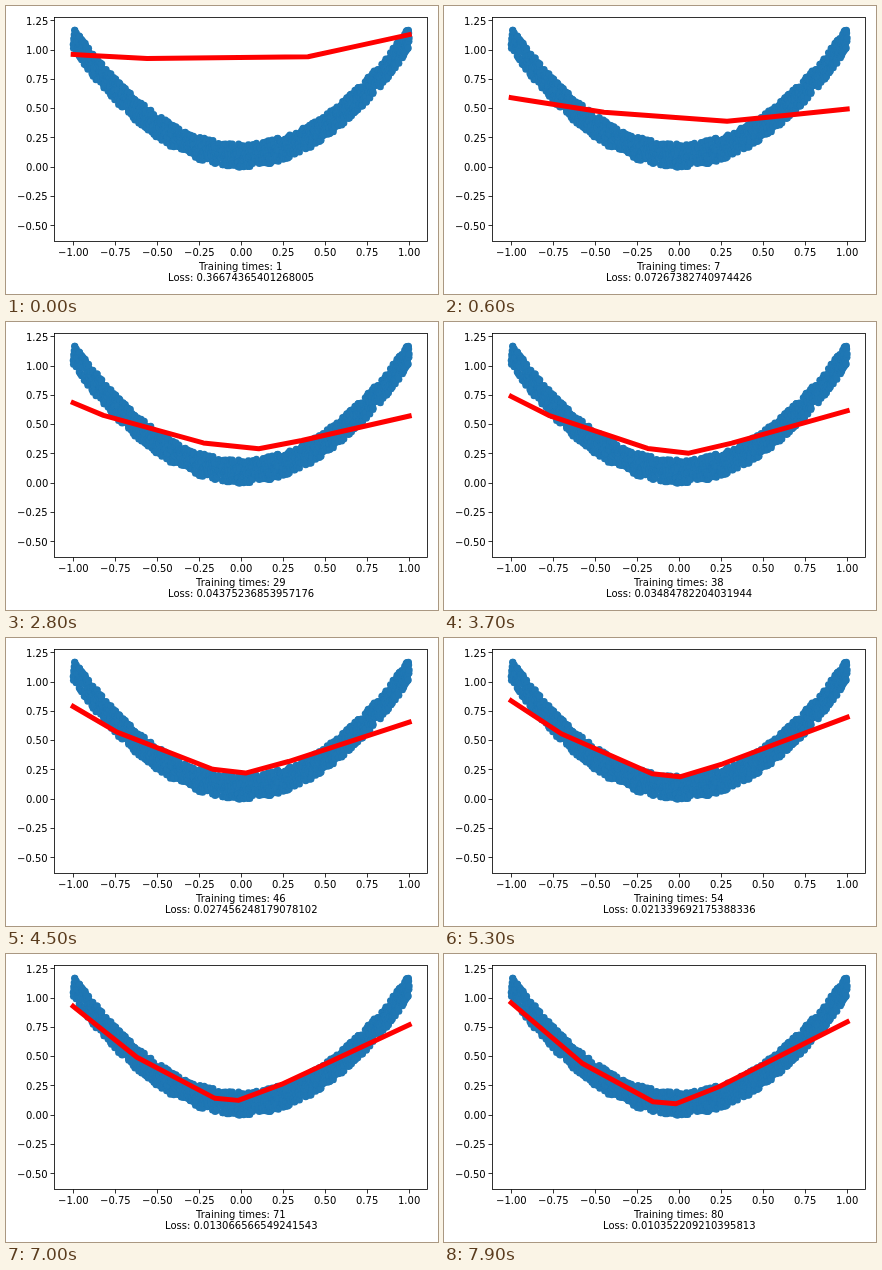
An HTML page with a canvas that plays this animation: 432 by 288 pixels, repeating every 8 s.

```html
<!DOCTYPE html>
<html>
<head>
<meta charset="utf-8">
<style>
html, body { margin: 0; width: 432px; height: 288px; overflow: hidden; background: #fff; }
canvas { display: block; }
</style>
</head>
<body>
<canvas id="stage" width="432" height="288"></canvas>
<script>
const ctx = document.getElementById('stage').getContext('2d');
const LOOP = 8000, STEP = 100, WARMUP = 6, LAST = 79;
const LEFT = 67.2, RIGHT = 403.2;

const px = x => 235.2 + 168 * x;
const py = y => 161.2 - 117 * y;
const mix = (a, b, t) => a + (b - a) * t;
const easeOut = (t, power) => 1 - (1 - t) ** power;
const steady = t => (t + t * t * (3 - 2 * t)) / 2;
const settle = step => 1 - 0.4 ** step;

// known losses; the steps between fall geometrically
const losses = [
  [0, 0.36674365401268005],
  [6, 0.07267382740974426],
  [18, 0.056338876485824585],
  [37, 0.03484782204031944],
  [45, 0.027456248179078102],
  [62, 0.016071390360593796],
  [79, 0.010352209210395813]
];

function lossAt(step) {
  const next = losses.findIndex(([at]) => at >= step);
  const [endAt, end] = losses[next];
  if (endAt === step) return end;
  const [startAt, start] = losses[next - 1];
  const t = step < WARMUP ? settle(step) : (step - startAt) / (endAt - startAt);
  return Math.fround(start * (end / start) ** t);
}

let seed = 20;
function random() {
  seed = (seed * 1664525 + 1013904223) % 4294967296;
  return seed / 4294967296;
}

const DOTS = 1400;
const dots = Array.from({ length: DOTS }, (_, i) => {
  const x = -1 + 2 * i / (DOTS - 1);
  return [px(x), py(Math.min(1.17, x * x + 0.2 * random()))];
});

function drawDots() {
  ctx.fillStyle = '#1f77b4';
  for (const [x, y] of dots) {
    ctx.beginPath();
    ctx.arc(x, y, 3.5, 0, 2 * Math.PI);
    ctx.fill();
  }
}

// a point between a and b, pushed down from their chord
function sagPoint(a, b, x, sag) {
  return [x, mix(a[1], b[1], (x - a[0]) / (b[0] - a[0])) + sag];
}

function fitAt(step) {
  const t = Math.max(0, step - WARMUP) / (LAST - WARMUP);
  const s = settle(step);
  const left = [LEFT, mix(48.5, mix(91.9, 48.8, steady(t)), s)];
  const right = [RIGHT, mix(28.7, mix(103.3, 67.8, steady(t)), s)];
  const bendA = [
    mix(141, mix(160, 209, easeOut(t, 4)), s),
    mix(52.5, mix(106.5, 147.7, easeOut(t, 1.2)), s)
  ];
  const bendB = [
    mix(302, mix(283, 232, easeOut(t, 2.5)), s),
    mix(50.7, mix(115.6, 149.8, easeOut(t, 1.1)), s)
  ];
  return [
    left,
    sagPoint(left, bendA, mix(80, 138, t), 11 * t),
    bendA,
    bendB,
    sagPoint(bendB, right, bendB[0] + 43, 3.5 * t),
    right
  ];
}

function drawFit(points) {
  ctx.strokeStyle = '#f00';
  ctx.lineWidth = 5;
  ctx.lineCap = 'square';
  ctx.lineJoin = 'round';
  ctx.beginPath();
  for (const [x, y] of points) ctx.lineTo(x, y);
  ctx.stroke();
}

function line(x1, y1, x2, y2) {
  ctx.beginPath();
  ctx.moveTo(x1, y1);
  ctx.lineTo(x2, y2);
  ctx.stroke();
}

// anchor: 0.5 centres the text on x, 1 ends it there
function label(text, x, y, anchor = 0.5) {
  ctx.fillText(text, Math.round(x - anchor * ctx.measureText(text).width), y);
}

const snap = v => Math.floor(v) + 0.5;
const tickText = v => (v < 0 ? '\u2212' : '') + Math.abs(v).toFixed(2);

function drawAxes() {
  ctx.strokeStyle = ctx.fillStyle = '#000';
  ctx.lineWidth = 0.8;
  ctx.lineCap = 'butt';
  ctx.lineJoin = 'miter';
  ctx.font = '10px "DejaVu Sans", sans-serif';
  ctx.strokeRect(48.5, 11.5, 373, 224);
  for (let v = -1; v <= 1; v += 0.25) {
    const x = snap(px(v));
    line(x, 235.5, x, 239.5);
    label(tickText(v), px(v), 250);
  }
  for (let v = -0.5; v <= 1.25; v += 0.25) {
    const y = snap(py(v));
    line(44.5, y, 48.5, y);
    label(tickText(v), 42, Math.round(py(v) + 3.8), 1);
  }
}

function draw(step) {
  ctx.fillStyle = '#fff';
  ctx.fillRect(0, 0, 432, 288);
  drawDots();
  drawFit(fitAt(step));
  drawAxes();
  label('Training times: ' + (step + 1), 235, 264);
  label('Loss: ' + lossAt(step), 235, 275);
}

let shown = -1;
const start = performance.now();
function tick() {
  const t = Math.max(0, performance.now() - start) % LOOP;
  const step = Math.floor(t / STEP);
  if (step !== shown) draw(shown = step);
  requestAnimationFrame(tick);
}
tick();
</script>
</body>
</html>
```
